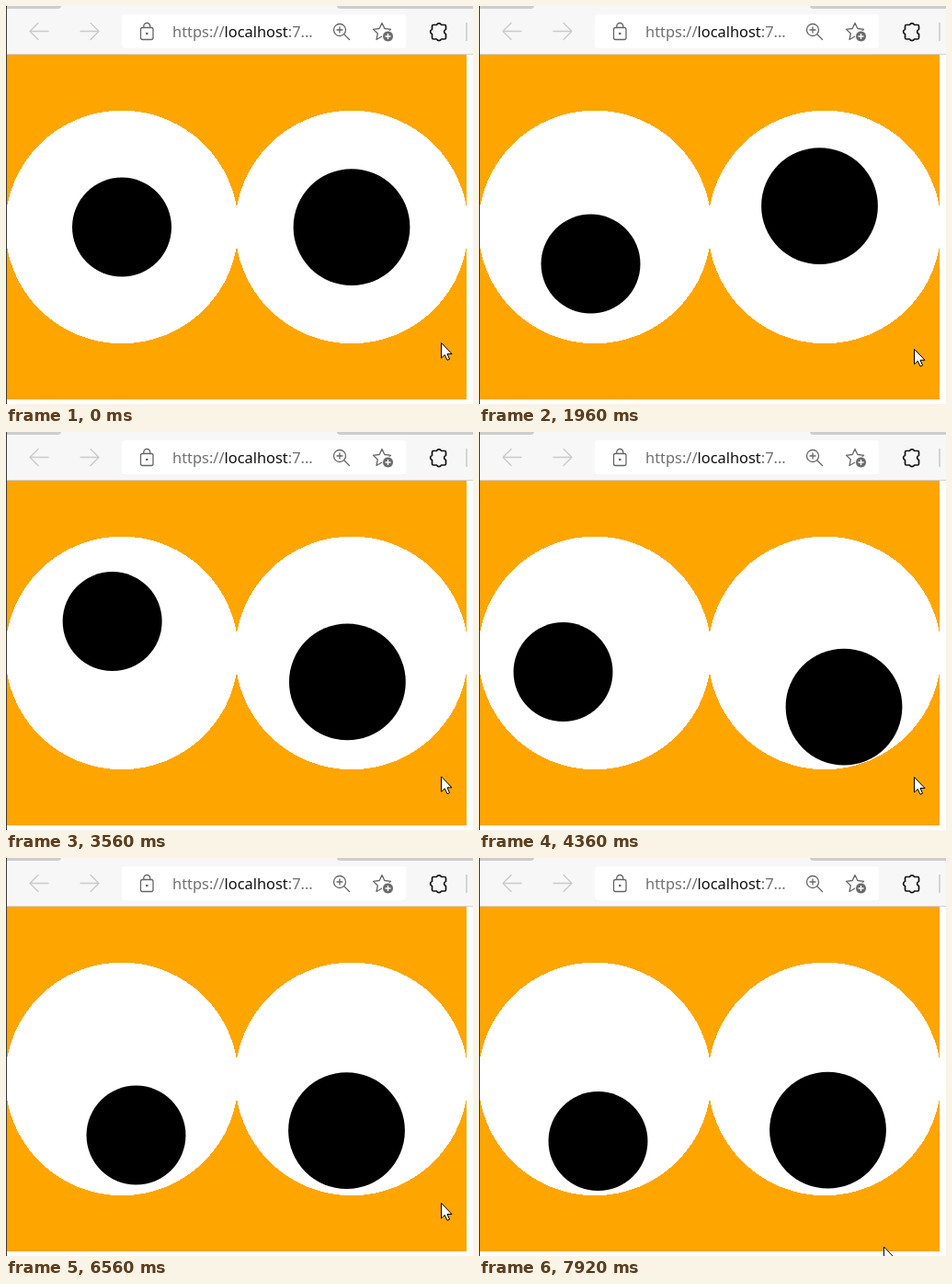
An HTML page for the animation above (8 s loop, 508 by 433 pixels).

```html
<!DOCTYPE html>
<html lang="en">
<head>
<meta charset="utf-8">
<title>Googly eyes</title>
<style>
  html, body { margin: 0; width: 100%; height: 100%; overflow: hidden; background: #fff; }
  svg { display: block; width: 508px; height: 433px; }
  text { font: 16.4px "Noto Sans", "Open Sans", sans-serif; fill: #707070; }
  .icon { fill: none; stroke: #666; stroke-width: 1.3; stroke-linecap: round; stroke-linejoin: round; }
  .off { stroke: #cacaca; }
  .on { stroke: #111; stroke-width: 1.7; }
  .eye { fill: #fff; shape-rendering: crispEdges; }
</style>
</head>
<body>
<svg viewBox="0 0 508 433">
  <!-- page -->
  <rect x="1" y="53" width="500" height="375" fill="#ffa500"/>
  <circle class="eye" cx="126" cy="240.400" r="126.800"/>
  <circle class="eye" cx="376" cy="240.400" r="126.800"/>
  <circle id="left" r="54"/>
  <circle id="right" r="63.400"/>

  <!-- browser bar -->
  <rect width="508" height="52" fill="#f7f7f7"/>
  <path d="M0 0H60Q60 3 56 3H0ZM360 0H508V3H364Q360 3 360 0Z" fill="#cdcdcd"/>
  <path d="M0 52.500H508" stroke="#d2d2d2"/>
  <rect x="126" y="9.500" width="309" height="37.500" rx="4" fill="#efefef"/>
  <rect x="126" y="9" width="309" height="37.500" rx="4" fill="#fff"/>
  <path class="icon off" d="M46 27.500H26M35 18.500L26 27.500L35 36.500M81 27.500H101M92 18.500L101 27.500L92 36.500"/>
  <g class="icon">
    <rect x="146.500" y="23.500" width="13.500" height="13" rx="2"/>
    <path d="M149.800 23.500V22a3.500 3.500 0 0 1 7 0V23.500"/>
    <circle cx="153.300" cy="30" r=".7" fill="#666"/>
    <circle cx="363" cy="26" r="6.500"/>
    <path d="M368 31L373.500 36.500M360 26H366M363 23V29"/>
    <path d="M409 18.500L411.800 24.500L418.500 25.400L413.700 30L414.500 36L409 33L403 36.500L404.300 30L399.500 25.400L406.200 24.500Z"/>
  </g>
  <circle cx="415.500" cy="33" r="6" fill="#6a6a6a" stroke="#fff"/>
  <path d="M412.500 33H418.500M415.500 30V36" stroke="#fff" stroke-width="1.400"/>
  <path class="icon on" d="M465 20.500H468.500A2.700 2.700 0 0 1 473.500 20.500H477Q478.500 20.500 478.500 22V25.500A2.600 2.600 0 0 0 478.500 30.500V34.500Q478.500 36 477 36H473.500A2.700 2.700 0 0 1 468.500 36H465Q463.500 36 463.500 34.500V30.500A2.600 2.600 0 0 1 463.500 25.500V22Q463.500 20.500 465 20.500Z"/>
  <path d="M501 18V38" stroke="#c8c8c8" stroke-width="1.500"/>
  <text x="181" y="33.500">https://<tspan fill="#111">localhost</tspan>:7...</text>
  <path d="M.5 0V433" stroke="#3a3a3a"/>

  <path id="pointer" d="M0 0V16.500L3.800 13L6.500 18.800L9 17.700L6.500 12H11.500Z" fill="#fff" stroke="#000"/>
</svg>
<script>
  const LOOP = 8000, STEP = 160, DELAY = 40;
  const [left, right, pointer] = ['left', 'right', 'pointer'].map(id => document.getElementById(id));

  // key poses: step, then offsets from the eye centres (left x, y, right x, y)
  const poses = [
    [3, 0, 0, 0, 0],
    [6, 41, 0, 4.5, -4],
    [12, -4.5, 40, -5.5, -23],
    [18, -8.5, -70.5, -17.5, 16.5],
    [24, -14, -7.5, 4.5, 39],
    [27, -34.5, 20.5, 21, 58.5],
    [31, -60, 38, 8, 30],
    [40, 15.5, 61, -5.5, 56],
    [47, -11, 70, 5, 45],
    [49, 3.5, 67.5, 3.5, 55.5]
  ];

  const clamp = (v, lo, hi) => Math.min(hi, Math.max(lo, v));
  const poseAt = i => poses[clamp(i, 0, poses.length - 1)];

  function slope(i, k) {
    const a = poseAt(i - 1), b = poseAt(i + 1);
    return (b[k] - a[k]) / (b[0] - a[0]);
  }

  // cubic Hermite curve through the poses
  function sample(step, k) {
    const s = clamp(step, poses[0][0], poseAt(Infinity)[0]);
    const next = Math.max(1, poses.findIndex(p => p[0] >= s));
    const a = poses[next - 1], b = poses[next];
    const span = b[0] - a[0], u = (s - a[0]) / span, w = 1 - u;
    return w * w * (1 + 2 * u) * a[k] + u * u * (3 - 2 * u) * b[k]
      + span * u * w * (w * slope(next - 1, k) - u * slope(next, k));
  }

  // keeps the pupil inside its eye
  function place(pupil, step, k, cx, reach) {
    const x = sample(step, k), y = sample(step, k + 1);
    const fit = Math.min(1, reach / (Math.hypot(x, y) || 1));
    pupil.setAttribute('cx', cx + x * fit);
    pupil.setAttribute('cy', 240.6 + y * fit);
  }

  // a short drift down, then a glide off the page
  function movePointer(t) {
    const rest = t < 800 ? 366.5 : Math.min(375.5, 371.3 + t / 1000);
    const u = clamp((t - 6960) / 360, 0, 1);
    pointer.setAttribute('transform', `translate(${473.5 - 33 * u} ${rest + (423 - rest) * u})`);
  }

  function draw(now) {
    const t = now % LOOP, step = Math.floor((t - DELAY) / STEP);
    place(left, step, 1, 126, 71.5);
    place(right, step, 3, 376, 62.5);
    movePointer(t);
    requestAnimationFrame(draw);
  }
  draw(0);
</script>
</body>
</html>
```
